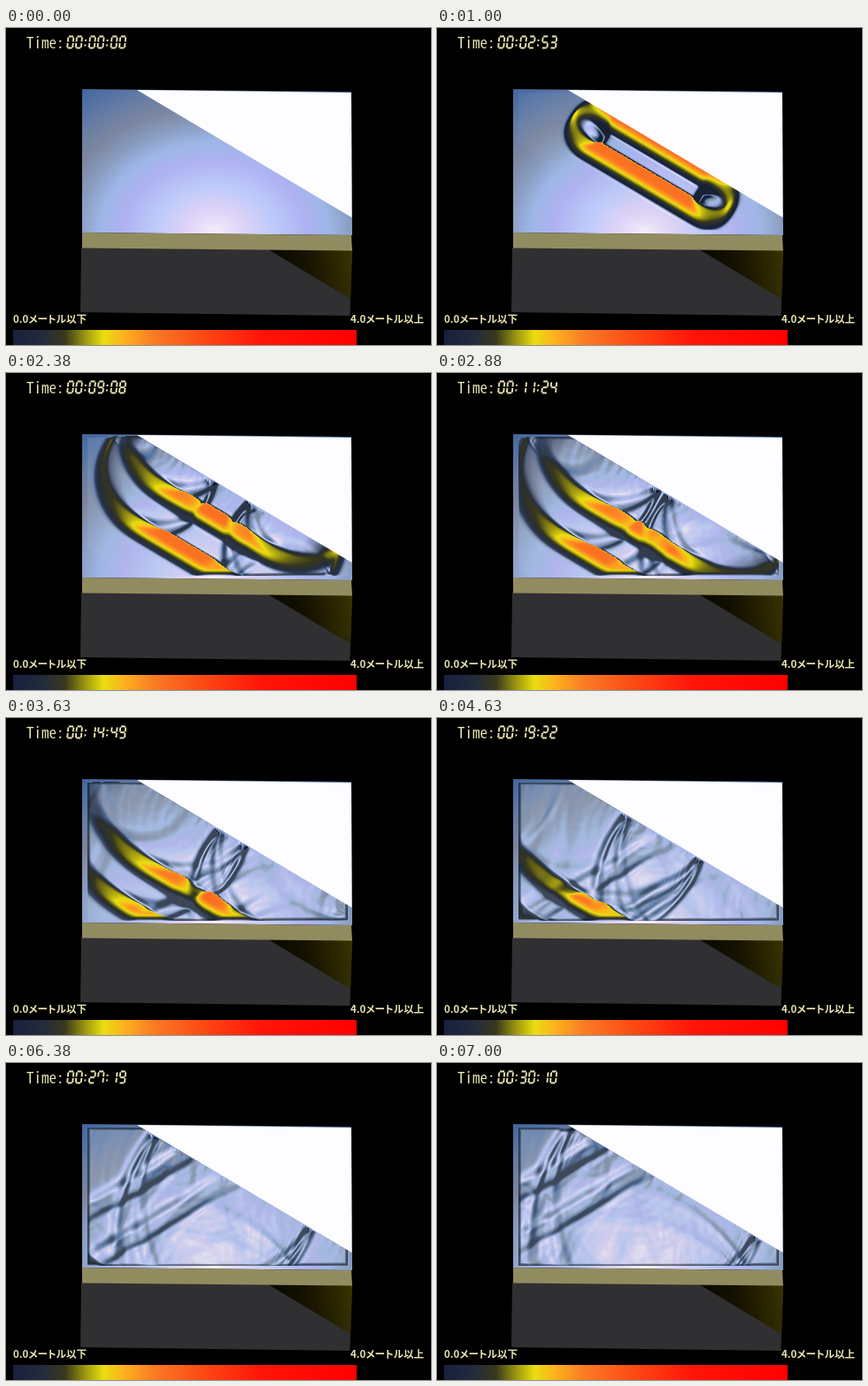
An HTML page with a canvas that plays this animation: 480 px wide and 358 px high, repeating every 7.12 s.

```html
<!DOCTYPE html>
<html lang="ja">
<head>
<meta charset="utf-8">
<title>Wave height</title>
<style>
html, body { margin: 0; width: 100%; height: 100%; overflow: hidden; background: #000; }
#sea { position: absolute; left: 86px; top: 69px; clip-path: polygon(0 0, 304px 3px, 305px 165px, 0 162px); }
svg { position: absolute; left: 0; top: 0; }
text { fill: #e8e4b0; font-family: "Noto Sans CJK JP", "Noto Sans CJK", sans-serif; }
.label { font-size: 11.6px; font-weight: 600; font-feature-settings: "palt"; }
.time { font-size: 17px; font-family: "Noto Sans Mono CJK JP", "Noto Sans Mono", monospace; }
</style>
</head>
<body>
<canvas id="sea" width="305" height="165"></canvas>
<svg width="480" height="358" viewBox="0 0 480 358">
  <defs>
    <linearGradient id="bar"></linearGradient>
    <linearGradient id="shade" x1="0" x2="1" y1="0.1" y2="0">
      <stop offset="0" stop-color="#080700"/><stop offset=".45" stop-color="#171300"/>
      <stop offset="1" stop-color="#393300"/>
    </linearGradient>
  </defs>
  <path d="M148 70L390 73L390.500 214Z" fill="#fdfdff"/>
  <path d="M85 248L391 251L388.500 325L84 321Z" fill="#302f31"/>
  <path d="M296 250L391 251L389 306Z" fill="url(#shade)"/>
  <path d="M86 231L390 234L391 251.500L86 248.500Z" fill="#918c60"/>
  <rect x="8" y="341" width="388" height="17" fill="url(#bar)"/>
  <text class="time" x="23" y="22.500">Time:</text>
  <path id="clock" transform="translate(70 9.500) skewX(-6)" fill="none" stroke="#e8e4b0" stroke-width="1.900"/>
  <text class="label" x="8" y="333">0.0メートル以下</text>
  <text class="label" x="389" y="333">4.0メートル以上</text>
</svg>
<script>
const FRAME = 125, FRAMES = 57, STEPS = 8, FIRST = 3;
const W = 294, H = 156, OX = 6, OY = 4;        // basin size and its offset in the canvas
const SX = 86, SY = 69;                        // canvas position on the stage
const SLOPE = 0.591, LEN = 165, WIDTH = 10.5, PEAK = 3.5;
const LIFT = 5.5, MIRROR = 2200;               // screen rise per metre, reflection shift per slope
const sea = document.getElementById('sea'), ctx = sea.getContext('2d');
const CW = sea.width, CH = sea.height;
const image = ctx.createImageData(CW, CH);
const clamp = (v, a, b) => Math.max(a, Math.min(b, v));

// Colour stops: [position, hex]
const skyStops = [[0, 'f6eefc'], [28, 'ddd2f8'], [55, 'bccaf9'], [82, 'b0b2f3'], [104, '9db6e6'],
  [125, '889bbe'], [145, '7c859f'], [168, '657ca5'], [195, '486ba3'], [235, '24385e'], [300, '0c1424']];
const heightStops = [[0, '17203f'], [.35, '232b3c'], [.6, '37381c'], [.85, 'a09a10'], [1.05, 'e8de10'],
  [1.3, 'fdb01c'], [1.65, 'fa7a24'], [2.2, 'fc4a14'], [2.9, 'ff1408'], [4, 'ff0000']];

function ramp(stops, size) {
  const max = stops[stops.length - 1][0];
  const channel = (hex, c) => parseInt(hex.substr(c * 2, 2), 16);
  return Array.from({ length: size + 1 }, (_, i) => {
    const v = i / size * max;
    const j = Math.max(1, stops.findIndex(s => s[0] >= v));
    const [a, ca] = stops[j - 1], [b, cb] = stops[j];
    const f = (v - a) / (b - a);
    return [0, 1, 2].map(c => channel(ca, c) * (1 - f) + channel(cb, c) * f);
  });
}
const sky = ramp(skyStops, 300), tint = ramp(heightStops, 400);
document.getElementById('bar').innerHTML = heightStops.map(([v, c]) =>
  `<stop offset="${v / 4}" stop-color="#${c}"/>`).join('');

// Position along and across the uplift line, in basin pixels
const norm = Math.hypot(1, SLOPE), tx = 1 / norm, ty = SLOPE / norm;
const startX = 171 - SX - OX, startY = 112.6 - SY - OY;
function toLine(x, y) {
  const dx = x - startX, dy = y - startY;
  return [dx * tx + dy * ty, dy * tx - dx * ty];
}

const wet = new Uint8Array(W * H), reach = new Float32Array(W * H);
const states = [];

function simulate() {
  let now = new Float32Array(W * H), next = new Float32Array(W * H);
  for (let y = 0, i = 0; y < H; y++) for (let x = 0; x < W; x++, i++) {
    wet[i] = y + SY + OY > 70 + (x + SX + OX - 148) * SLOPE ? 1 : 0;
    const [along, across] = toLine(x, y);
    const past = Math.max(-along, along - LEN, 0);
    reach[i] = Math.hypot(past, across);
    if (wet[i]) now[i] = PEAK * Math.exp(-((across / WIDTH) ** 4)) / (1 + Math.exp((Math.abs(along - LEN / 2) - LEN / 2) / 1.2));
  }
  let prev = now.slice();
  // The open edges are tuned slightly slow, so they reflect a weak wave
  const courant = 0.5, c2 = courant * courant, exit = courant * 0.75, q = (exit - 1) / (exit + 1);
  const open = (edge, inner) => { if (wet[edge]) next[edge] = now[inner] + q * (next[inner] - now[edge]); };
  const total = (FRAMES - 1 - FIRST) * STEPS + 1;
  for (let n = 0; n <= total; n++) {
    if (n % STEPS === 1) states.push(now.slice());
    for (let y = 1; y < H - 1; y++) for (let x = 1; x < W - 1; x++) {
      const i = y * W + x;
      if (!wet[i]) continue;
      const u = now[i];
      const lap = wet[i - 1] * (now[i - 1] - u) + wet[i + 1] * (now[i + 1] - u) +
        wet[i - W] * (now[i - W] - u) + wet[i + W] * (now[i + W] - u);
      next[i] = 2 * u - prev[i] + c2 * lap;
    }
    for (let y = 1; y < H - 1; y++) { open(y * W, y * W + 1); open(y * W + W - 1, y * W + W - 2); }
    for (let x = 0; x < W; x++) { open(x, x + W); open((H - 1) * W + x, (H - 2) * W + x); }
    [prev, now, next] = [now, next, prev];
  }
}

// Canvas-sized layers: height, slopes and darkness of the basin rim
const [level, slopeX, slopeY, rim] = Array.from({ length: 4 }, () => new Float32Array(CW * CH));

function loadLayers(k) {
  for (const layer of [level, slopeX, slopeY, rim]) layer.fill(0);
  if (k < FIRST) return;
  const field = states[k - FIRST], front = (k - FIRST) * STEPS / 2 - 8;
  for (let y = 0, i = 0; y < H; y++) for (let x = 0; x < W; x++, i++) {
    if (!wet[i]) continue;
    const h = field[i], o = (y + OY) * CW + x + OX;
    const at = (j, ok) => ok && wet[j] ? field[j] : h;
    level[o] = h;
    slopeX[o] = at(i + 1, x < W - 1) - at(i - 1, x > 0);
    slopeY[o] = at(i + W, y < H - 1) - at(i - W, y > 0);
    const gap = Math.min(x, y, W - 1 - x, H - 1 - y);
    if (gap < 3 && reach[i] < front) rim[o] = 0.8 - gap * 0.2;
  }
}

// Nearest surface point seen at a screen row, as a fractional row
function visibleRow(x, row) {
  const screen = y => y - LIFT * level[y * CW + x];
  let y = Math.min(CH - 2, row + Math.ceil(LIFT * PEAK));
  while (y > 0 && screen(y) > row) y--;
  const a = screen(y), b = screen(y + 1);
  return y + clamp((row - a) / (b - a), 0, 1);
}

function drawSea(k) {
  loadLayers(k);
  const silver = k < FIRST ? 0 : 0.3 * Math.min(1, k / 30);
  const px = image.data;
  for (let row = 0, p = 0; row < CH; row++) for (let x = 0; x < CW; x++, p += 4) {
    const y = visibleRow(x, row), y0 = Math.min(CH - 2, Math.floor(y)), f = y - y0, o = y0 * CW + x;
    const sample = layer => layer[o] * (1 - f) + layer[o + CW] * f;
    const h = sample(level), edge = sample(rim);
    const mix = level[o] ? silver : 0;
    // Sloped water mirrors a shifted part of the sky
    const d = Math.hypot((x + SX - 235 - MIRROR * sample(slopeX)) / 1.25, row + SY - 232 - MIRROR * sample(slopeY));
    const s = sky[Math.min(300, Math.round(d))];
    const cover = clamp((h - 0.12) / 0.3, 0, 1);
    const t = tint[clamp(Math.round(h * 100), 0, 400)];
    for (let c = 0; c < 3; c++) {
      let v = s[c] + (176 + c * 16 - s[c]) * mix;
      v += (18 + c * 12 - v) * edge;
      px[p + c] = v + (t[c] - v) * cover;
    }
    px[p + 3] = 255;
  }
  ctx.putImageData(image, 0, 0);
}

// Seven segments: top, upper right, lower right, bottom, lower left, upper left, middle
const segments = ['1 0h5', '6.500 1v5', '6.500 7.500v5', '1 13h5', '.5 7.500v5', '.5 1v5', '1 6.700h5'];
const lit = ['012345', '12', '01346', '01236', '1256', '02356', '023456', '0125', '0123456', '012356'];

function drawClock(k) {
  const s = Math.max(0, Math.floor(34.1 * k - 99.5));
  const label = [0, Math.floor(s / 60), s % 60].map(v => String(v).padStart(2, '0')).join(':');
  let x = 0, d = '';
  const move = (seg) => {
    const [, mx, rest] = seg.match(/^(\S+) (.+)$/);
    d += `M${x + Number(mx)} ${rest}`;
  };
  for (const ch of label) {
    if (ch === ':') { move('1.200 3.500v2'); move('1.200 9v2'); x += 5.4; }
    else { for (const n of lit[ch]) move(segments[n]); x += 9.6; }
  }
  document.getElementById('clock').setAttribute('d', d);
}

let shown = -1;
function render(time) {
  const k = Math.floor(time % 7120 / FRAME);
  if (k !== shown) {
    shown = k;
    drawSea(k);
    drawClock(k);
  }
}

simulate();
const begin = performance.now();
function tick() {
  render(performance.now() - begin);
  requestAnimationFrame(tick);
}
tick();
</script>
</body>
</html>
```
